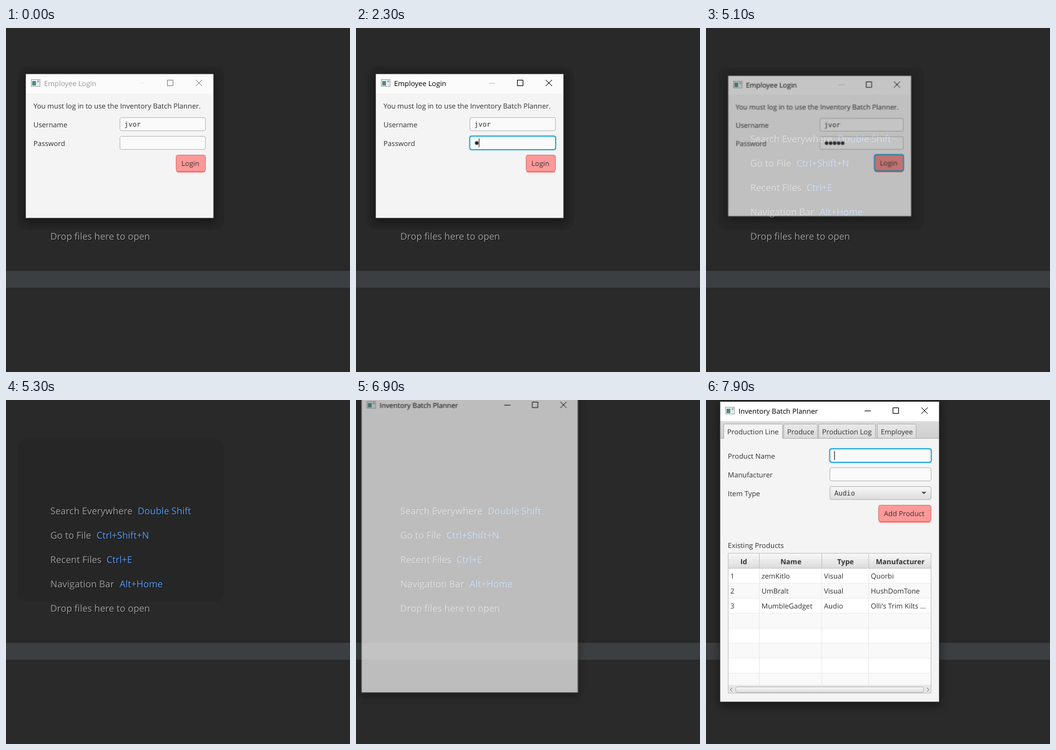
Write an HTML page that moves like this. It is 551 px wide and 551 px high and loops after 8000 ms.

```html
<!DOCTYPE html>
<html lang="en">
<head>
<meta charset="utf-8">
<title>Employee login</title>
<style>
html, body { margin: 0; width: 100%; height: 100%; overflow: hidden; background: #282828; }
svg { display: block; width: 100vw; height: 100vh; }
text { font: 11.25px "Open Sans", "Noto Sans", sans-serif; fill: #333; text-rendering: geometricPrecision; white-space: pre; }
.caption { font-size: 11.35px; fill: #000; }
.mono { font: 11px "DejaVu Sans Mono", monospace; }
.prompt { fill: #b4b4b4; }
.bold { font-weight: 700; text-anchor: middle; }
.hint { font-size: 14.9px; fill: #a0a0a0; text-shadow: 1px 1px 0 #111; }
.key { fill: #589df6; }
.shadow { filter: blur(7px); }
.idle .caption { fill: #999; }

/* Every state change is a hard cut within one shared 8 s loop. */
.anim { animation: 8s step-end infinite; }
.idle { animation-name: idle; }
.active { animation-name: active; }
.prompt { animation-name: prompt; }
.dots { animation-name: dots; }
.focus { animation-name: focus; }
.typing { animation-name: typing; }
.caret { animation-name: blink; }
.hover { animation-name: hover; }
.press { animation-name: press; }
.login { animation-name: close; transform-origin: 182px 189px; }
.ghost { animation-name: ghost; }
.main { animation-name: open; transform-origin: 198px 243px; }
.content { animation-name: content; }
.main-caret { animation-name: main-blink; }

@keyframes idle { 0% { opacity: 1 } 16.25%, 100% { opacity: 0 } }
@keyframes active { 0% { opacity: 0 } 16.25%, 100% { opacity: 1 } }
@keyframes prompt { 0% { opacity: 1 } 17.5%, 100% { opacity: 0 } }
@keyframes dots { 0% { opacity: 0 } 17.5%, 100% { opacity: 1 } }
@keyframes focus { 0% { opacity: 0 } 17.5% { opacity: 1 } 61.25%, 100% { opacity: 0 } }
@keyframes typing {
  0% { transform: none }
  28.75% { transform: translateX(6.6px) }
  32.5% { transform: translateX(13.2px) }
  40% { transform: translateX(19.8px) }
  43.75% { transform: translateX(26.4px) }
  47.5%, 100% { transform: translateX(33px) }
}
@keyframes blink {
  0% { opacity: 0 } 17.5% { opacity: 1 } 23.75% { opacity: 0 } 28.75% { opacity: 1 }
  37.5% { opacity: 0 } 40% { opacity: 1 } 52.5% { opacity: 0 } 57.5% { opacity: 1 }
  61.25%, 100% { opacity: 0 }
}
@keyframes hover { 0% { opacity: 0 } 58.75%, 100% { opacity: 1 } }
@keyframes press { 0% { opacity: 0 } 61.25%, 100% { opacity: 1 } }
@keyframes close {
  0% { opacity: 1; transform: none }
  63.75% { opacity: .75; transform: scale(.975) }
  65% { opacity: .2; transform: scale(.93) }
  66.25%, 100% { opacity: 0; transform: scale(.9) }
}
@keyframes ghost { 0% { opacity: .05 } 85%, 100% { opacity: 0 } }
@keyframes open {
  0% { opacity: 0; transform: none }
  85% { opacity: .165; transform: translate(-17px, -13px) scale(.96) }
  86.25% { opacity: .72; transform: translate(-16px, -12px) scale(.988) }
  87.5% { opacity: 1; transform: translate(-16px, -12px) }
  98.75%, 100% { opacity: 1; transform: none }
}
@keyframes content { 0% { opacity: 0 } 88.75%, 100% { opacity: 1 } }
@keyframes main-blink { 0% { opacity: 1 } 91.25% { opacity: 0 } 96.25%, 100% { opacity: 1 } }
</style>
</head>
<body>
<svg id="stage" viewBox="0 0 551 551">
  <defs>
    <linearGradient id="raised" x2="0" y2="1"><stop stop-color="#f8f8f8"/><stop offset="1" stop-color="#dcdcdc"/></linearGradient>
    <linearGradient id="tab" x2="0" y2="1"><stop stop-color="#e9e9e9"/><stop offset="1" stop-color="#d8d8d8"/></linearGradient>
    <linearGradient id="strip" x2="0" y2="1"><stop stop-color="#dadada"/><stop offset="1" stop-color="#cfcfcf"/></linearGradient>
  </defs>
</svg>
<script>
const APP = "Inventory Batch Planner";

const text = (x, y, label, cls = "") => `<text x="${x}" y="${y}" class="${cls}">${label}</text>`;
const rect = (x, y, w, h, fill, extra = "") =>
  `<rect x="${x}" y="${y}" width="${w}" height="${h}" fill="${fill}" ${extra}/>`;
const box = (x, y, w, h, fill, stroke, r = 2.5) =>
  rect(x + .5, y + .5, w - 1, h - 1, fill, `stroke="${stroke}" rx="${r}"`);
const path = (d, stroke) => `<path d="${d}" fill="none" stroke="${stroke}"/>`;
const group = (cls, ...parts) => `<g class="${cls}">${parts.join("")}</g>`;
const anim = (cls, ...parts) => group("anim " + cls, ...parts);

function titleBar(x, y, w, title, ink, minInk) {
  const right = x + w;
  return rect(x + 8.5, y + 8.5, 14, 11, "#ececec", 'stroke="#a9a9a9"') +
    rect(x + 10, y + 11, 6, 7, "#4b8d84") +
    rect(x + 18, y + 10, 3, 3, "#8fb3c4") +
    text(x + 29, y + 19, title, "caption") +
    path(`M${right - 119} ${y + 14.5}h10`, minInk) +
    path(`M${right - 73.5} ${y + 9.5}h9v9h-9z`, ink) +
    path(`M${right - 28} ${y + 9}l10 10m0 -10l-10 10`, ink);
}

const frame = (x, y, w, h, fill) =>
  rect(x - 3, y, w + 6, h + 7, "#000", 'class="shadow" opacity=".4"') +
  rect(x - .5, y - .5, w + 1, h + 1, fill, 'stroke="#000" stroke-opacity=".35"');

const field = (x, y, w) => box(x, y, w, 22, "#fafafa", "#bcbcbc");
const focusRing = (x, y, w, h) =>
  rect(x - .5, y - .5, w + 1, h + 1, "none", 'rx="3.5" stroke="#039ed3" stroke-opacity=".18" stroke-width="2"') +
  rect(x + .3, y + .3, w - .6, h - .6, "none", 'rx="3" stroke="#039ed3" stroke-width="1.4"');
const button = (x, y, w, fill) =>
  rect(x + 1, y + 1, w - 2, 27.5, "#ff7373", 'rx="3"') + box(x, y, w, 27, fill, "#cf7878", 3);

function backdrop() {
  const hints = [
    ["Search Everywhere", "Double Shift", 211],
    ["Go to File", "Ctrl+Shift+N", 145],
    ["Recent Files", "Ctrl+E", 161],
    ["Navigation Bar", "Alt+Home", 182],
    ["Drop files here to open"],
  ];
  return rect(0, 0, 551, 551, "#292929") +
    rect(0, 389, 551, 27, "#3c3f41") +
    rect(0, 416, 551, 135, "#2a2a2a") +
    anim("ghost", rect(19, 63, 330, 260, "#000", 'rx="12"')) +
    hints.map(([label, key, x], i) => {
      const y = 183 + 39 * i;
      return text(71, y, label, "hint") + (key ? text(x, y, key, "hint key") : "");
    }).join("");
}

function loginWindow() {
  const dots = [0, 1, 2, 3, 4]
    .map(i => `<circle cx="${193.4 + 6.6 * i}" cy="184.2" r="2.9" fill="#2d2d2d"/>`);
  return anim("login",
    frame(32, 74, 300, 230, "#f4f4f4"),
    rect(32, 74, 300, 31, "#fbfbfb"),
    anim("idle", titleBar(32, 74, 300, "Employee Login", "#858585", "#f0f0f0")),
    anim("active", titleBar(32, 74, 300, "Employee Login", "#000", "#ccc")),
    text(44, 129, `You must log in to use the ${APP}.`),
    text(44, 159, "Username"),
    text(44, 189, "Password"),
    field(182, 143, 138),
    text(189.5, 158, "jvor", "mono"),
    field(182, 173, 138),
    text(189.5, 188, "abCd!", "mono anim prompt"),
    anim("dots", ...dots),
    anim("typing",
      rect(190, 177, 36, 14, "#fafafa"),
      rect(190, 177, 1, 14, "#222", 'class="anim caret"')),
    anim("focus", focusRing(182, 173, 138, 22)),
    button(272, 203, 48, "#ff9999"),
    anim("hover", button(272, 203, 48, "#ffa8a8")),
    anim("press", button(272, 203, 48, "#f58b8b"), focusRing(272, 203, 48, 27)),
    text(281, 221, "Login"));
}

function tabs() {
  const list = [["Production Line", 28, 95], ["Produce", 124, 55], ["Production Log", 180, 92], ["Employee", 274, 63]];
  return rect(23, 34, 350, 28, "url(#strip)") +
    list.map(([label, x, w], i) => box(x, 38, w, 26, i ? "url(#tab)" : "#f4f4f4", "#b3b3b3", 2)).join("") +
    rect(23, 62, 350, 421, "#f4f4f4") +
    path("M23 61.5H28M123 61.5H373", "#b3b3b3") +
    list.map(([label, x]) => text(x + 6, 55, label)).join("");
}

function table() {
  const rows = [
    ["1", "zemKitlo", "Visual", "Quorbi"],
    ["2", "UmBralt", "Visual", "HushDomTone"],
    ["3", "MumbleGadget", "Audio", "Olli's Trim Kilts ..."],
  ];
  const columns = [39, 89, 189, 264];
  const heads = [["Id", 60.5], ["Name", 136], ["Type", 223.5], ["Manufacturer", 311]];
  const stripes = [...Array(8).keys()].map(i => {
    const y = 270 + 24 * i, h = Math.min(24, 457 - y);
    return rect(36, y, 324, h, i % 2 ? "#f9f9f9" : "#fff") + path(`M36 ${y + h - .5}h324`, "#ededed");
  });
  return rect(35, 245, 326, 225, "#fff") +
    rect(36, 246, 324, 23, "url(#raised)") +
    stripes.join("") +
    path("M85.5 270V457M185.5 270V457M260.5 270V457", "#e9e9e9") +
    path("M36 269.5H360M85.5 246V269M185.5 246V269M260.5 246V269", "#c4c4c4") +
    heads.map(([label, x]) => text(x, 263, label, "bold")).join("") +
    rows.map((row, r) => row.map((cell, c) => text(columns[c], 286 + 24 * r, cell)).join("")).join("") +
    rect(36, 457, 324, 13, "#e6e6e6") +
    box(47, 459, 302, 10, "url(#raised)", "#b8b8b8", 3) +
    path("M42 461l-3 3l3 3M354 461l3 3l-3 3", "#777") +
    path("M35.5 245.5h325v224h-325z", "#c4c4c4");
}

function mainWindow() {
  const form = text(35, 94, "Product Name") + text(35, 124, "Manufacturer") + text(35, 154, "Item Type") +
    field(198, 78, 163) + focusRing(198, 78, 163, 22) +
    rect(205, 82, 1.6, 14, "#666", 'class="anim main-caret"') +
    field(198, 108, 163) +
    box(198, 138, 163, 22, "url(#raised)", "#b8b8b8") +
    text(205.5, 153, "Audio", "mono") +
    '<path d="M345 147h8l-4 4z" fill="#555"/>' +
    button(276, 168, 85, "#ff9999") + text(285, 186, "Add Product") +
    text(35, 237, "Existing Products");
  return anim("main",
    frame(23, 3, 350, 480, "#f9f9f9"),
    anim("content", rect(23, 3, 350, 31, "#fff"), tabs(), form, table()),
    titleBar(23, 3, 350, APP, "#000", "#000"));
}

document.getElementById("stage").insertAdjacentHTML("beforeend", backdrop() + loginWindow() + mainWindow());
</script>
</body>
</html>
```
